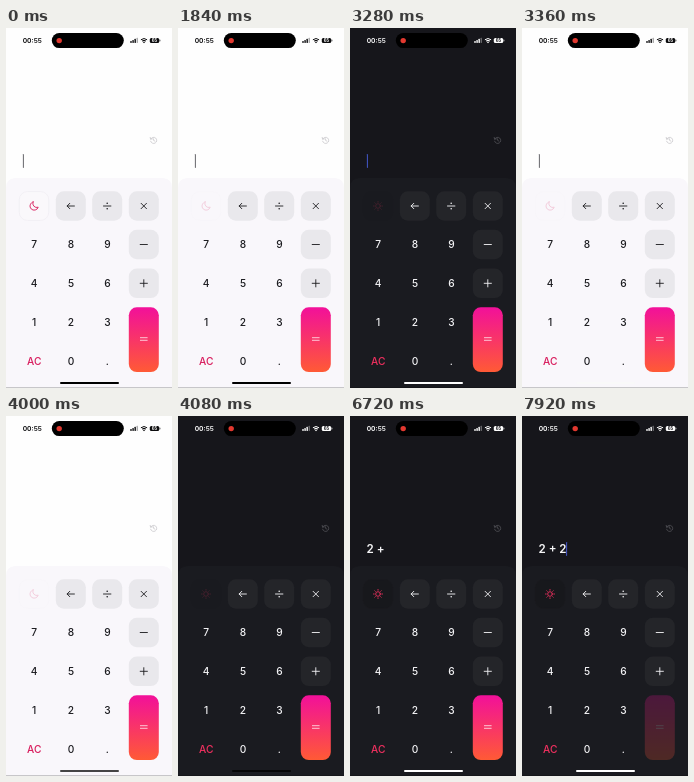
Recreate the animation shown at these times as an HTML page. Size 166 px wide and 360 px high, loop 8 s.

```html
<!DOCTYPE html>
<html lang="en">
<head>
<meta charset="utf-8">
<style>
html, body { margin: 0; width: 100%; height: 100%; overflow: hidden; }
body {
  --page: #fefefe; --panel: #f9f7fb; --key: #e9e8ec; --ink: #1b1b1f;
  --accent: #d81b5c; --modeFill: #faf8fb; --modeLine: #f0edf2;
  --caret: #55555a; --history: #c2c1c5; --status: #0c0c0e; --onStatus: #fff;
  background: var(--page);
}
body.dark {
  --page: #16161b; --panel: #1a1b20; --key: #242529; --ink: #f4f4f6;
  --accent: #f0305f; --modeFill: #17181c; --modeLine: #1a1b1f;
  --caret: #4a60e0; --history: #5a595f; --status: #fff; --onStatus: #16161b;
}
svg { display: block; width: 100vw; height: 100vh; font-family: Inter, "Liberation Sans", sans-serif; }
text { fill: var(--ink); }
.line { fill: none; stroke: var(--ink); stroke-width: .9; stroke-linecap: round; stroke-linejoin: round; }
.accent { stroke: var(--accent); }
.moon, .dark .sun { display: inline; }
.sun, .dark .moon { display: none; }
</style>
</head>
<body>
<svg viewBox="0 0 166 360">
  <defs>
    <linearGradient id="hot" x1="0" y1="0" x2="0" y2="1">
      <stop offset="0" stop-color="#f2109a"/>
      <stop offset="1" stop-color="#ff5a35"/>
    </linearGradient>
  </defs>
  <rect width="166" height="360" fill="var(--page)"/>

  <g id="status" fill="var(--status)">
    <text x="16.7" y="14.9" font-size="6.7" font-weight="600" style="fill:var(--status)">00:55</text>
    <rect x="45.8" y="5.1" width="72" height="15" rx="7.5" fill="#000"/>
    <circle cx="53.2" cy="12.6" r="2.7" fill="#e2382f"/>
    <rect x="124.3" y="13" width="1.4" height="2" rx=".4"/>
    <rect x="126.4" y="12" width="1.4" height="3" rx=".4"/>
    <rect x="128.5" y="10.8" width="1.4" height="4.2" rx=".4"/>
    <rect x="130.6" y="9.8" width="1.4" height="5.2" rx=".4" opacity=".35"/>
    <path d="M138 15.3l-1.2-1.4q1.2-.9 2.4 0z"/>
    <path d="M134.9 11.8q3.1-2.6 6.2 0M136 13.1q2-1.6 4 0" fill="none" stroke="var(--status)" stroke-width="1"/>
    <rect x="143.8" y="10" width="9.4" height="5" rx="1.6"/>
    <rect x="153.6" y="11.6" width=".7" height="1.8" rx=".35"/>
    <text x="148.5" y="14.1" font-size="4.4" font-weight="700" text-anchor="middle" style="fill:var(--onStatus)">65</text>
  </g>

  <g fill="none" stroke="var(--history)" stroke-width=".7" stroke-linecap="round" stroke-linejoin="round">
    <path d="M144.8 111a3.1 3.1 0 1 1 -.2 2.2M144.2 109.4l.4 1.8 1.8-.3M147.6 110.8v1.6l1.3.7"/>
  </g>

  <text id="entry" x="16.5" y="136.8" font-size="11.6" font-weight="600"></text>
  <rect id="caret" y="126" width=".9" height="14" rx=".4" fill="var(--caret)"/>

  <path d="M0 360V160q0-10 10-10h146q10 0 10 10v200z" fill="var(--panel)"/>
  <rect y="359.2" width="166" height=".8" opacity=".25"/>
  <g id="keys"></g>
  <rect id="home" x="54" y="354" width="59" height="1.9" rx=".95"/>
</svg>
<script>
const DURATION = 8000;
const cols = [28, 64.8, 101.2, 137.8], rows = [178, 216.5, 255.3, 294, 333];
const $ = id => document.getElementById(id);

const rays = [...Array(8)].map((_, i) => {
  const c = Math.cos(i * Math.PI / 4), s = Math.sin(i * Math.PI / 4);
  return `M${c * 3.8} ${s * 3.8}L${c * 4.5} ${s * 4.5}`;
}).join('');
const line = (d, cls = '') => `<path class="line ${cls}" d="${d}"/>`;
const box = (fill, h = 29.4) => `<rect x="-15" y="-14.7" width="30" height="${h}" rx="8" fill="${fill}"/>`;
const dot = y => `<circle cy="${y}" r=".8" fill="var(--ink)"/>`;

function key(id, col, row, body) {
  $('keys').innerHTML += `<g id="${id}" transform="translate(${cols[col]} ${rows[row]})">${body}</g>`;
}
function digit(label, col, row) {
  const style = label === 'AC' ? 'style="fill:var(--accent)"' : '';
  key('k' + label, col, row,
    `<text x=".2" y="3.7" font-size="10.2" font-weight="450" text-anchor="middle" ${style}>${label}</text>`);
}

key('mode', 0, 0,
  `<rect x="-14.7" y="-14.4" width="29.4" height="28.8" rx="8" fill="var(--modeFill)" stroke="var(--modeLine)" stroke-width=".7"/>
  <g class="moon">${line('M-.9-4.1A4.2 4.2 0 1 0 4.2 1.2A4 4 0 0 1-.9-4.1z', 'accent')}</g>
  <g class="sun"><circle class="line accent" r="2.3"/>${line(rays, 'accent')}</g>`);
key('back', 1, 0, box('var(--key)') + line('M3.6 0H-3.6M-1-2.7L-3.7 0L-1 2.7'));
key('divide', 2, 0, box('var(--key)') + line('M-3.7 0H3.7') + dot(-2.8) + dot(2.8));
key('times', 3, 0, box('var(--key)') + line('M-2.7-2.7L2.7 2.7M2.7-2.7L-2.7 2.7'));
key('minus', 3, 1, box('var(--key)') + line('M-3.6 0H3.6'));
key('plus', 3, 2, box('var(--key)') + line('M-3.6 0H3.6M0-3.6V3.6'));
key('equals', 3, 3, box('url(#hot)', 64.8) +
  '<path d="M-3.4 15.7H3.4M-3.4 18.3H3.4" stroke="#fff" stroke-width=".8" stroke-linecap="round" opacity=".9"/>');
['789', '456', '123'].forEach((r, y) => [...r].forEach((d, x) => digit(d, x, y + 1)));
['AC', '0', '.'].forEach((d, x) => digit(d, x, 4));

// key, touch down, touch up
const presses = [
  ['mode', 1680, 1900], ['mode', 3120, 3340], ['mode', 3840, 4060],
  ['k2', 5400, 5520], ['plus', 5840, 5960], ['k2', 6800, 6940], ['equals', 7790, 8100]
];
const toggles = presses.filter(p => p[0] === 'mode').map(p => p[2]);
const typed = presses.slice(3, 6).map(p => p[2]);
const entries = ['', '2', '2 +', '2 + 2'], caretX = [16.9, 24.4, 35.8, 44.2];

const clamp = x => Math.max(0, Math.min(1, x));
const ease = x => x < .5 ? 2 * x * x : 1 - 2 * (1 - x) ** 2;
const passed = (times, t) => times.filter(x => t >= x).length;

function touch(t, down, up) {
  const held = ease(clamp((Math.min(t, up) - down) / 150));
  return 1 - .8 * held * (1 - ease(clamp((t - up) / 250)));
}

function draw(t) {
  const flips = passed(toggles, t), dark = flips % 2;
  document.body.className = dark ? 'dark' : '';

  const shade = {};
  for (const [id, down, up] of presses) shade[id] = Math.min(shade[id] ?? 1, touch(t, down, up));
  for (const id in shade) $(id).setAttribute('opacity', shade[id]);

  const n = passed(typed, t);
  $('entry').textContent = entries[n];
  $('caret').setAttribute('x', caretX[n]);
  const blink = t / 900 % 1;
  $('caret').setAttribute('opacity', blink > .1 && blink < .6 ? 0 : 1);

  const settle = flips ? clamp((t - toggles[flips - 1]) / 900) : 1;
  const tone = Math.round(255 * (dark ? settle : 1 - settle));
  $('home').setAttribute('fill', `rgb(${tone},${tone},${tone})`);
}

const start = performance.now();
function tick() {
  draw((performance.now() - start) % DURATION);
  requestAnimationFrame(tick);
}
tick();
</script>
</body>
</html>
```
